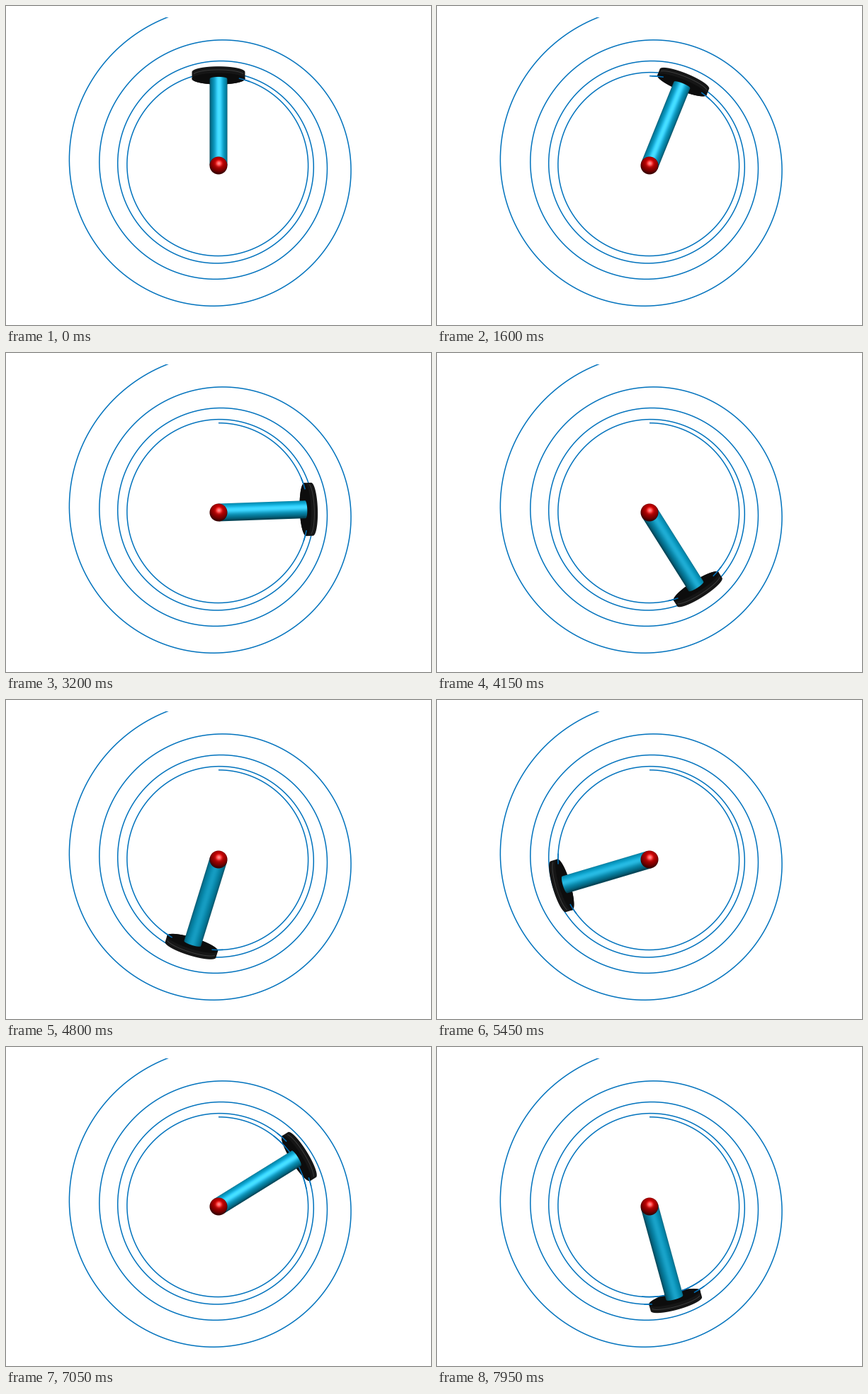
These frames come from a looping animation (600 by 450 pixels, 8 s). A matplotlib script:

```python
import numpy as np
import matplotlib.pyplot as plt
from matplotlib.animation import FuncAnimation
from matplotlib.patches import Polygon, Rectangle

W, H, DPI = 600, 450, 100
FRAMES, STEP = 160, 50
CX, CY = 300, 225
BLUE = (0, 114 / 255, 189 / 255)

ROD_R = 12.5            # rod and ball radius
WHEEL_R = 37.5
WHEEL_E = 8.0           # short half axis of the tilted wheel face
WHEEL_T = 4.7           # half thickness of the wheel as seen
TILT = np.arcsin(WHEEL_E / WHEEL_R)
ROD_E = ROD_R * np.sin(TILT)

LIGHT = np.array([0.10, 0.48, 0.87])
LIGHT /= np.linalg.norm(LIGHT)
HALF = LIGHT + [0, 0, 1]
HALF /= np.linalg.norm(HALF)

ROD_COLOR = np.array([0.03, 0.68, 0.86])
BALL_COLOR = np.array([0.82, 0.0, 0.0])


def angle(t):
    """Clockwise angle from the top, in radians, at t seconds."""
    return np.radians(8.6 * t**2 - 7.5e-5 * t**6)


def radius(theta):
    n = theta / (2 * np.pi)
    return 126.3 + n**2 * (5 + 0.07 * n**2)


def to_stage(u, s, theta):
    """u runs outward along the rod, s sideways (clockwise)."""
    x = CX + u * np.sin(theta) + s * np.cos(theta)
    y = CY - u * np.cos(theta) + s * np.sin(theta)
    return x, y


def shade(normal, color, ambient, diffuse, spec, power):
    lit = np.clip(normal @ LIGHT, 0, 1)
    shine = np.clip(normal @ HALF, 0, 1) ** power
    rgb = color * (ambient + diffuse * lit)[..., None] + spec * shine[..., None]
    return np.clip(rgb, 0, 1)


fig = plt.figure(figsize=(W / DPI, H / DPI), dpi=DPI, facecolor="white")
ax = fig.add_axes([0, 0, 1, 1])
ax.set_xlim(0, W)
ax.set_ylim(H, 0)
ax.axis("off")

# spiral track, cut off at the top edge of the plot
track = np.linspace(0, 8 * np.pi, 2400)
tx, ty = to_stage(radius(track), 0, track)
view = Rectangle((0, 16), W, H - 16, transform=ax.transData)
style = dict(color=BLUE, lw=1.08, solid_capstyle="butt")
ax.plot(tx, ty, zorder=1, **style)[0].set_clip_path(view)

psi = np.linspace(0, 2 * np.pi, 121)
wheel = ax.add_patch(Polygon([[0, 0]], fc="#161616", ec="none", zorder=2))
face = ax.add_patch(Polygon([[0, 0]], fc="#0d0d0d", ec="none", zorder=3))
gleam, = ax.plot([], [], color="#3c3c3c", lw=0.7, zorder=4)
front, = ax.plot([], [], zorder=5, **style)

# pixel window that holds the rod and the ball
X0, X1, Y0, Y1 = 140, 460, 65, 385
px, py = np.meshgrid(np.arange(X0, X1) + 0.5 - CX, np.arange(Y0, Y1) + 0.5 - CY)

dist = np.hypot(px, py)
bx, by = px / ROD_R, -py / ROD_R
bz = np.sqrt(np.clip(1 - bx**2 - by**2, 0, 1))
ball_rgb = shade(np.stack([bx, by, bz], -1), BALL_COLOR, 0.3, 0.65, 0.55, 22)
ball_a = np.clip(ROD_R + 0.5 - dist, 0, 1)[..., None]

picture = ax.imshow(np.zeros((Y1 - Y0, X1 - X0, 4)), extent=(X0, X1, Y1, Y0),
                    interpolation="nearest", aspect="auto", zorder=6)
ax.set_xlim(0, W)
ax.set_ylim(H, 0)


def rod_and_ball(theta, end):
    sn, cs = np.sin(theta), np.cos(theta)
    u = px * sn - py * cs
    s = px * cs + py * sn
    v = np.clip(s / ROD_R, -1, 1)
    w = np.sqrt(1 - v**2)
    side = np.array([cs, -sn, 0])
    up = np.array([sn * np.sin(TILT), cs * np.sin(TILT), np.cos(TILT)])
    normal = v[..., None] * side + w[..., None] * up
    rgb = shade(normal, ROD_COLOR, 0.40, 0.55, 0.25, 12)
    a = np.clip(ROD_R + 0.5 - np.abs(s), 0, 1)
    a = a * np.clip(end + ROD_E * w - u + 0.5, 0, 1)
    a = (a * np.clip(u + ROD_E * w + 0.5, 0, 1))[..., None]
    alpha = ball_a + a * (1 - ball_a)
    mix = (ball_rgb * ball_a + rgb * a * (1 - ball_a)) / np.maximum(alpha, 1e-6)
    return np.concatenate([mix, alpha], -1)


def update(i):
    theta = angle(i * STEP / 1000)
    mid = radius(theta) + 0.8
    s, e = WHEEL_R * np.cos(psi), WHEEL_E * np.sin(psi)

    rim = mid + e + WHEEL_T * np.sign(np.sin(psi))
    wheel.set_xy(np.column_stack(to_stage(rim, s, theta)))
    face.set_xy(np.column_stack(to_stage(mid - WHEEL_T + e, s, theta)))
    arc = slice(6, 55)
    gleam.set_data(*to_stage(mid + e[arc], 0.97 * s[arc], theta))

    # the part of the track that passes before the inner face
    u = (tx - CX) * np.sin(theta) - (ty - CY) * np.cos(theta) - mid
    across = (tx - CX) * np.cos(theta) + (ty - CY) * np.sin(theta)
    near = (u < -4) & (u > -20) & (np.abs(across) < 45)
    front.set_data(np.where(near, tx, np.nan), np.where(near, ty, np.nan))

    picture.set_data(rod_and_ball(theta, mid - WHEEL_T))
    return wheel, face, gleam, front, picture


anim = FuncAnimation(fig, update, frames=FRAMES, interval=STEP,
                     init_func=lambda: update(0), repeat=True, repeat_delay=0)
plt.show()
```
